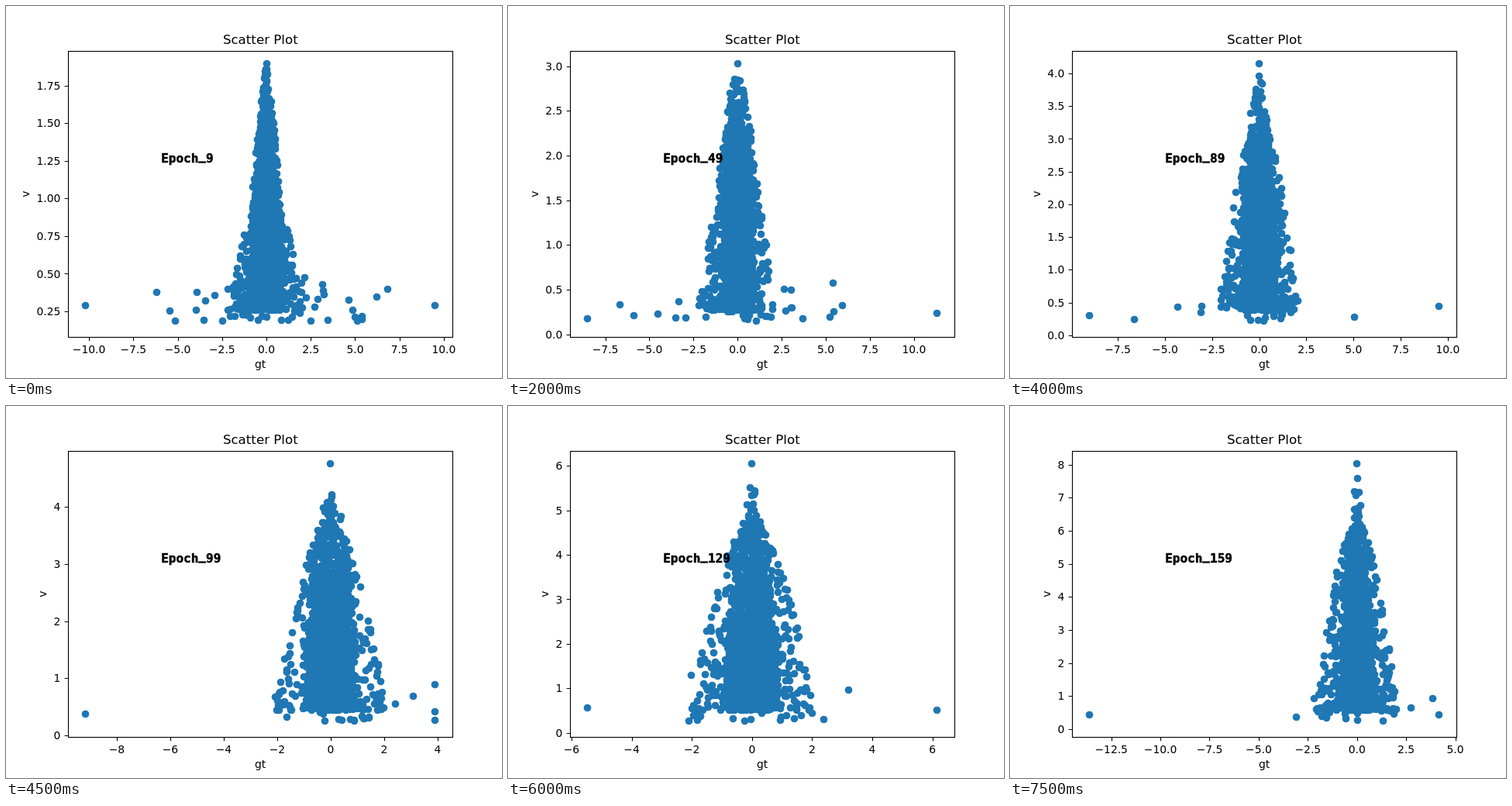
Write an HTML page that moves like this. It is 640 px wide and 480 px high and loops after 8 s.

```html
<!DOCTYPE html>
<html lang="en">
<head>
<meta charset="utf-8">
<title>Scatter Plot</title>
<style>
  html, body { margin: 0; width: 100%; height: 100%; overflow: hidden; background: #fff; }
  svg { display: block; width: 640px; height: 480px; font: 13.89px "DejaVu Sans", sans-serif; }
  .title { font-size: 16.67px; }
  .mid { text-anchor: middle; }
  .end { text-anchor: end; }
  .dots { fill: none; stroke: #1f77b4; stroke-width: 9.72; stroke-linecap: round; }
  .line { fill: none; stroke: #000; stroke-width: 1.11; }
  .epoch { font: bold 16px "DejaVu Sans Mono", monospace; stroke: #000; stroke-width: .5; }
  .view { visibility: hidden; animation: show 8s step-end infinite; }
  @keyframes show {
    0% { visibility: visible; }
    6.25%, 100% { visibility: hidden; }
  }
</style>
</head>
<body>
<svg viewBox="0 0 640 480">
  <g id="views"></g>
  <rect class="line" x="80.5" y="58.5" width="496" height="369"/>
  <text class="title mid" x="328.3" y="49.2">Scatter Plot</text>
  <text class="mid" x="328" y="467">gt</text>
</svg>
<script>
const VIEWS = 16;
const BOX = { left: 80, right: 576, top: 57.6, bottom: 427.2 };
const BASE = 393, PEAK = 74;

// Key views: data range of both axes, and how blunt the core's tip is
const keys = [
  { i: 0, x: [-10.2, 9.5], y: [.166, 1.895], blunt: 2.3 },
  { i: 2, x: [-9.12, 9.1], y: [.139, 2.838], blunt: 6 },
  { i: 4, x: [-8.51, 11.3], y: [.114, 3.029], blunt: 5.5 },
  { i: 5, x: [-9.5, 9.19], y: [.13, 3.5], blunt: 4.5 },
  { i: 6, x: [-8.94, 13.27], y: [.135, 3.881], blunt: 4 },
  { i: 8, x: [-9, 9.53], y: [.17, 4.15], blunt: 3 },
  { i: 9, x: [-9.17, 3.9], y: [.198, 4.754], blunt: 2.5 },
  { i: 12, x: [-5.47, 6.15], y: [.195, 6.052], blunt: 2 },
  { i: 15, x: [-13.61, 4.17], y: [.155, 8.03], blunt: 1.4 }
];

const mix = (a, b, t) => a + (b - a) * t;
const clamp = (v, lo, hi) => Math.min(Math.max(v, lo), hi);
const snap = v => Math.floor(v + .5) + .5;

function stateAt(i) {
  const n = Math.max(1, keys.findIndex(k => k.i >= i));
  const a = keys[n - 1], b = keys[n], t = (i - a.i) / (b.i - a.i);
  const pair = name => a[name].map((v, j) => mix(v, b[name][j], t));
  return { x: pair("x"), y: pair("y"), blunt: mix(a.blunt, b.blunt, t) };
}

function seeded(seed) {
  return () => {
    seed = (seed + 0x6d2b79f5) | 0;
    let t = Math.imul(seed ^ (seed >>> 15), 1 | seed);
    t = (t + Math.imul(t ^ (t >>> 7), 61 | t)) ^ t;
    return ((t ^ (t >>> 14)) >>> 0) / 4294967296;
  };
}

// Axis limits carry a 5 % margin; the step leaves at most nine intervals
function axis([min, max], from, to) {
  const pad = (max - min) * .05, lo = min - pad, hi = max + pad;
  const scale = (to - from) / (hi - lo);
  const step = [.25, .5, 1, 2, 2.5, 5].find(s => (hi - lo) / s <= 9);
  const digits = step === .25 ? 2 : step % 1 ? 1 : 0;
  const at = v => from + (v - lo) * scale;
  const ticks = [];
  for (let k = Math.ceil(lo / step); k * step <= hi; k++) {
    const v = k * step;
    ticks.push({ pos: at(v), label: (v < 0 ? "\u2212" : "") + Math.abs(v).toFixed(digits) });
  }
  return { at, ticks, digits };
}

function dots(i, state, xAxis) {
  const rand = seeded(i * 977 + 5);
  const side = () => rand() < .5 ? -1 : 1;
  let d = "";
  const dot = (gt, y) => { d += `M${Math.floor(xAxis.at(gt)) + .5} ${Math.floor(y) + .5}h.01`; };
  const rise = h => mix(BASE, PEAK, h);

  // Dense core, thinning out towards its tip
  const thinning = 2 + .1 * i;
  for (let n = 0; n < 1500; n++) {
    const h = 1 - rand() ** (1 / thinning);
    const half = .85 * (1 - h ** state.blunt);
    dot(side() * half * rand() * (.8 + .35 * rand()), rise(h));
  }

  // Looser wings out to two units, which grow taller over the early epochs
  const height = clamp(.5 + .125 * (i - 2), .5, .75);
  for (let n = 0; n < 380; n++) {
    const part = rand() ** 1.4;
    dot(side() * 2.05 * Math.sqrt(1 - part) * rand(), rise(height * part));
  }

  // A few low points, then outliers that get rarer with training
  for (let n = 0; n < 14; n++) dot(side() * 2 * rand(), BASE + 14 * rand());
  const [min, max] = state.x;
  for (let n = Math.max(4, 32 - 3 * i); n > 0; n--) {
    const gt = side() * (2 + 5 * rand() ** 2);
    dot(clamp(gt, min, max), 407 - 60 * rand() ** 1.4);
  }
  dot(min, 385 + 20 * rand());
  dot(max, 385 + 20 * rand());
  dot(0, PEAK);
  return `<path class="dots" d="${d}"/>`;
}

function view(i) {
  const state = stateAt(i);
  const x = axis(state.x, BOX.left, BOX.right), y = axis(state.y, BOX.bottom, BOX.top);
  let marks = "", labels = "";
  for (const { pos, label } of x.ticks) {
    marks += `M${snap(pos)} 427.5v4.86`;
    labels += `<text class="mid" x="${pos}" y="448">${label}</text>`;
  }
  for (const { pos, label } of y.ticks) {
    marks += `M80.5 ${snap(pos)}h-4.86`;
    labels += `<text class="end" x="70.3" y="${Math.round(pos + 5.1)}">${label}</text>`;
  }
  // The axis name keeps clear of the tick labels
  const labelWidth = 8.84 * (1 + y.digits) + (y.digits ? 4.4 : 0);
  const nameX = Math.floor(61.4 - labelWidth);
  return `<g class="view" style="animation-delay:${i / 2 - 8}s">
    ${dots(i, state, x)}<path class="line" d="${marks}"/>${labels}
    <text class="mid" transform="translate(${nameX} 242.6) rotate(-90)">v</text>
    <text class="epoch" x="200.2" y="201.5">Epoch<tspan dy="-3">_</tspan><tspan dy="3">${i * 10 + 9}</tspan></text>
  </g>`;
}

document.getElementById("views").innerHTML = Array.from({ length: VIEWS }, (_, i) => view(i)).join("");
</script>
</body>
</html>
```
